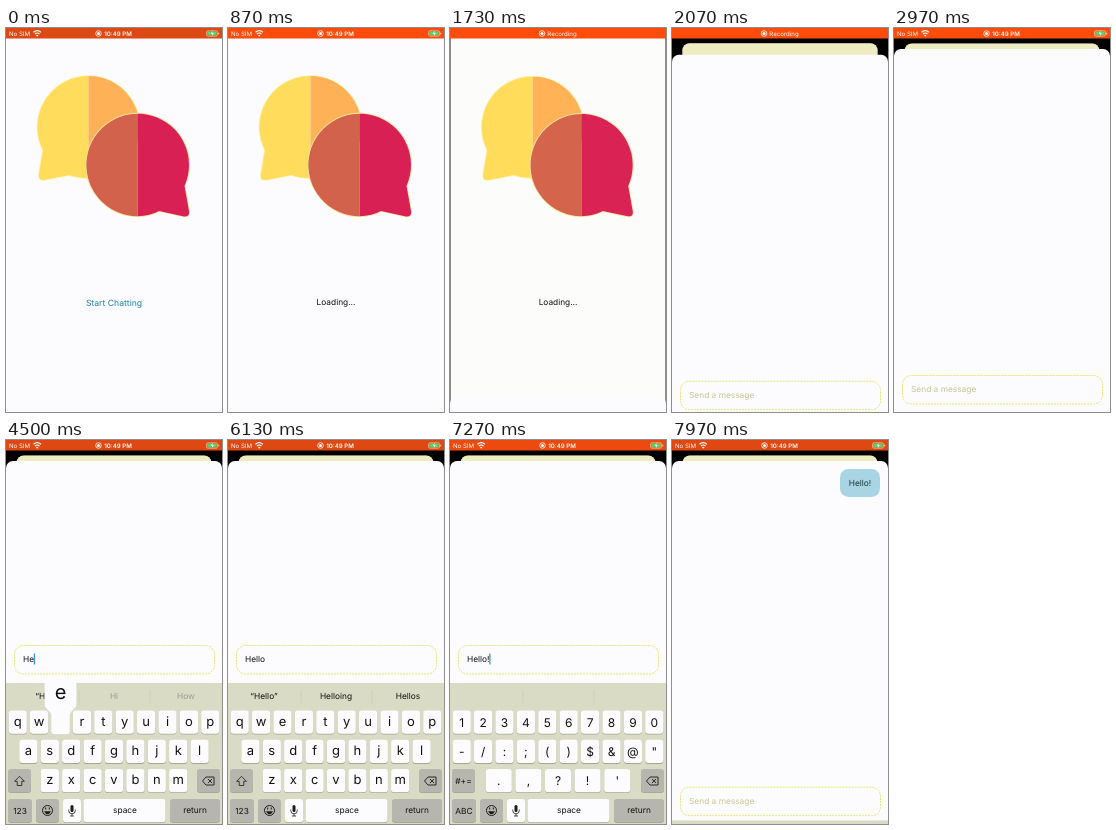
An HTML page for the animation above (8 s loop, 216 by 384 pixels).

```html
<!DOCTYPE html>
<html lang="en">
<head>
<meta charset="utf-8">
<title>Chat demo</title>
<style>
html, body { margin: 0; width: 100%; height: 100%; overflow: hidden; background: #000; }
svg { display: block; width: 100vw; height: 100vh; }
text { font-family: Inter, "Open Sans", sans-serif; font-size: 8.35px; fill: #101210; text-rendering: geometricPrecision; white-space: pre; }
</style>
</head>
<body>
<svg id="stage" viewBox="0 0 216 384"></svg>
<script>
const LOOP = 8000;
const PAPER = '#fcfcfe', GRAY_KEY = '#b6b6ae', INK = '#1c1c18';
const stage = document.getElementById('stage');

function el(parent, tag, attrs = {}, content) {
  const node = document.createElementNS('http://www.w3.org/2000/svg', tag);
  for (const name in attrs) node.setAttribute(name, attrs[name]);
  if (content !== undefined) node.textContent = content;
  parent.appendChild(node);
  return node;
}
const group = parent => el(parent, 'g');
const rect = (p, x, y, width, height, fill, rx = 0) => el(p, 'rect', { x, y, width, height, fill, rx });
const path = (p, d, attrs) => el(p, 'path', { d, fill: 'none', ...attrs });
const label = (p, x, y, str, attrs = {}) => el(p, 'text', { x, y, 'text-anchor': 'middle', ...attrs }, str);
const show = (node, on) => { node.style.display = on ? '' : 'none'; };
const shift = (node, y) => node.setAttribute('transform', `translate(0 ${y})`);

const clamp = v => Math.max(0, Math.min(1, v));
const span = (t, from, length) => clamp((t - from) / length);
const easeOut = p => 1 - (1 - p) ** 4;
const settle = (t, from, rate) => {
  const x = Math.max(0, t - from) / 1000 * rate;
  return 1 - (1 + x) * Math.exp(-x);
};

// Welcome screen
const card = group(stage);
const cardPaper = rect(card, 0, 0, 216, 384, PAPER);
function halves(d, split, left, right, edge) {
  const id = 'clip' + split;
  el(el(card, 'clipPath', { id }), 'path', { d });
  path(card, d, { stroke: edge, 'stroke-width': 1.6 });
  const inside = el(card, 'g', { 'clip-path': `url(#${id})` });
  rect(inside, 0, 40, split, 160, left);
  rect(inside, split, 40, 216, 160, right);
}
halves('M37 122A51 51 0 1 1 82.5 150Q72 150 63 147L38 152Q32 152.5 33 146Z', 82.5, '#ffdc5b', '#ffb157', '#fff0a8');
halves('M178.5 158A51.3 51.3 0 1 0 131.5 188.3Q144 188 153 183L178 188.5Q184 189 183 183Z', 131.5, '#d3624c', '#d92055', '#f8e2a0');
const startText = label(card, 108, 278, 'Start Chatting', { style: 'fill:#1b82ad;font-size:8.65px' });
const loadingText = label(card, 108, 277.3, 'Loading...');
const cardShade = rect(card, 0, 0, 216, 384, '#cbc42f');

// Chat sheet
const sheet = group(stage);
rect(sheet, 0, 21, 216, 420, PAPER, 7);
const bubble = group(sheet);
rect(bubble, 168, 29, 40, 28, '#a9d4e3', 8.5);
label(bubble, 188, 46, 'Hello!', { style: 'fill:#17383a' });
const field = group(sheet);
el(field, 'rect', { x: 8.5, y: 347.5, width: 200, height: 28.5, rx: 9, fill: PAPER, stroke: '#e8e570', 'stroke-dasharray': '2 1' });
const draft = label(field, 17, 364.3, '', { 'text-anchor': 'start' });
const caret = rect(field, 0, 355.5, 1.3, 11, '#3f92dd');

// Keyboard
const keyboard = group(stage);
rect(keyboard, 0, 243, 216, 145, '#dadbc5');
for (const x of [73, 144]) rect(keyboard, x - 0.3, 250, 0.6, 13, '#c8c8b2');
const hints = [36, 108, 180].map(x => label(keyboard, x, 259, ''));

function key(parent, cx, top, width, fill = '#fcfcfe') {
  rect(parent, cx - width / 2, top + 0.8, width, 23.3, '#a5a591', 3);
  rect(parent, cx - width / 2, top, width, 23.3, fill, 3);
}

function drawBottomRow(parent, modeName) {
  key(parent, 14, 359, 24, GRAY_KEY);
  label(parent, 14, 373.5, modeName);
  key(parent, 41.5, 359, 23, GRAY_KEY);
  const ink = { stroke: INK, 'stroke-width': 1 };
  el(parent, 'circle', { cx: 41.5, cy: 370.5, r: 5, fill: 'none', ...ink });
  path(parent, 'M38 371.2Q41.5 377.5 45 371.2Z', { fill: INK });
  path(parent, 'M39.7 367.5v2M43.3 367.5v2', ink);
  key(parent, 66, 359, 18);
  rect(parent, 64.5, 365, 3, 7, INK, 1.5);
  path(parent, 'M62.7 369.5v1a3.3 3.3 0 0 0 6.6 0v-1M66 374v2M64 376h4', { ...ink, 'stroke-width': 0.8 });
  key(parent, 118.5, 359, 82);
  label(parent, 119, 373.3, 'space');
  key(parent, 189, 359, 50, GRAY_KEY);
  label(parent, 189, 373.3, 'return');
}

function drawDelete(parent) {
  key(parent, 202.5, 329, 23, GRAY_KEY);
  path(parent, 'M196.5 341l3.5 -4h8v8h-8ZM202 339l4 4M206 339l-4 4', { stroke: INK, 'stroke-width': 0.9 });
}

function buildLayout(rows, mode) {
  const layer = group(keyboard);
  const spots = {};
  const size = mode === 'lower' ? 13 : 12;
  rows.forEach((row, r) => {
    const top = [270.5, 299.8, 329][r];
    const wide = row.length === 5;
    const pitch = wide ? 29.6 : 21.4;
    [...row].forEach((char, i) => {
      const cx = 108 + (i - (row.length - 1) / 2) * pitch;
      key(layer, cx, top, wide ? 26 : 18.2);
      label(layer, cx, top + (mode === 'lower' ? 15.4 : 16), char, { style: `font-size:${size}px` });
      spots[char] = { cx, top, half: wide ? 13 : 9.1 };
    });
  });
  key(layer, 13.5, 329, 23, mode === 'upper' ? PAPER : GRAY_KEY);
  if (mode === 'symbols') label(layer, 13.5, 343.5, '#+=');
  else path(layer, 'M13.5 336.3l4.9 5h-2.6v4.2h-4.6v-4.2h-2.6Z', {
    fill: mode === 'upper' ? '#000' : 'none', stroke: INK, 'stroke-width': 0.8, 'stroke-linejoin': 'round'
  });
  drawDelete(layer);
  drawBottomRow(layer, mode === 'symbols' ? 'ABC' : '123');
  return { layer, spots };
}
const letters = ['qwertyuiop', 'asdfghjkl', 'zxcvbnm'];
const layouts = {
  upper: buildLayout(letters.map(row => row.toUpperCase()), 'upper'),
  lower: buildLayout(letters, 'lower'),
  symbols: buildLayout(['1234567890', '-/:;()$&@"', ".,?!'"], 'symbols')
};

const popup = group(keyboard);
const popupShape = path(popup, '', { fill: PAPER });
const popupChar = label(popup, 0, 0, '', { style: 'font-size:20px' });
function placePopup(char, { cx, top, half }) {
  const w = half + 6.8, y = top - 32;
  popupShape.setAttribute('d', `M${cx - w + 5} ${y}H${cx + w - 5}q5 0 5 5v20c0 7 -6.8 6 -6.8 13v15q0 3 -3 3H${cx - half + 3}q-3 0 -3 -3v-15c0 -7 -6.8 -6 -6.8 -13v-20q0 -5 5 -5Z`);
  popupChar.setAttribute('x', cx);
  popupChar.setAttribute('y', y + 20.8);
  popupChar.textContent = char;
}

// Status bar
const bar = rect(stage, 0, 0, 216, 10.5, '#e04a12');
const white = { style: 'fill:#fff;font-size:6.1px' };
function recordDot(parent, cx) {
  el(parent, 'circle', { cx, cy: 5.5, r: 2.8, fill: 'none', stroke: '#fff', 'stroke-width': 0.8 });
  el(parent, 'circle', { cx, cy: 5.5, r: 1.5, fill: '#fff' });
}
const clockBar = group(stage);
label(clockBar, 3, 7.8, 'No SIM', { ...white, 'text-anchor': 'start' });
path(clockBar, 'M27.5 4.3q3.7 -3.2 7.4 0M28.9 6q2.3 -2 4.6 0', { stroke: '#fff', 'stroke-width': 1.2 });
path(clockBar, 'M29.9 7.2q1.3 -1 2.6 0l-1.3 1.5Z', { fill: '#fff' });
recordDot(clockBar, 92.5);
label(clockBar, 112, 7.8, '10:49 PM', { style: 'fill:#fff;font-size:6.1px;font-weight:600' });
el(clockBar, 'rect', { x: 200.5, y: 2.8, width: 11, height: 5.4, rx: 1.5, fill: 'none', stroke: '#ffd9c8', 'stroke-width': 0.6 });
rect(clockBar, 201.3, 3.6, 9.4, 3.8, '#55d46a', 0.8);
path(clockBar, 'M206.7 2.8l-2 3h1.5l-.5 2.4 2.2 -3.2h-1.6Z', { fill: '#fff' });
rect(clockBar, 212.3, 4.5, 0.9, 2, '#ffd9c8', 0.4);
const recordingBar = group(stage);
recordDot(recordingBar, 92);
label(recordingBar, 112, 7.8, 'Recording', white);

// Timeline
const presses = [[4130, 'H'], [4440, 'e'], [4760, 'l'], [4960, 'l'], [5300, 'o'], [6880, '!']];
const suggestions = [
  [4430, '“H”', 'Hi', 'How'], [4640, '“He”', 'Hey', 'Her'], [4870, '“Hel”', 'Help', 'Hello'],
  [5080, '“Hell”', 'Hello', 'Hells'], [5400, '“Hello”', 'Helloing', 'Hellos'], [6980, '', '', '']
];
const glow = [[0, 0], [850, 0.9], [1730, 1], [3570, 0.95], [4500, 0], [5300, 0.6], [6130, 0], [7050, 0.6], [8000, 0]];
const SENT = 7450;

function sample(steps, t) {
  const i = Math.max(1, steps.findIndex(step => step[0] > t));
  const [t0, a] = steps[i - 1], [t1, b] = steps[i];
  return a + (b - a) * (t - t0) / (t1 - t0);
}
const lastBefore = (steps, t) => steps.filter(step => step[0] <= t).pop();

function renderStatus(t) {
  const g = sample(glow, t);
  bar.setAttribute('fill', `rgb(${222 + 33 * g},${72 + 4 * g},${18 - 6 * g})`);
  const recording = span(t, 1000, 200) - span(t, 2350, 200);
  recordingBar.setAttribute('opacity', recording);
  clockBar.setAttribute('opacity', 1 - recording);
}

function renderScreens(t) {
  const p = settle(t, 1712, 17);
  const scale = 1 - 0.098 * p;
  card.setAttribute('transform', `translate(${108 * (1 - scale)} ${15.5 * p}) scale(${scale})`);
  cardPaper.setAttribute('rx', 8 * p);
  cardShade.setAttribute('rx', 8 * p);
  cardShade.setAttribute('opacity', 0.3 * p);
  show(startText, t < 700);
  show(loadingText, t >= 700);
  startText.setAttribute('opacity', 1 - 0.75 * span(t, 420, 120));
  shift(sheet, 363 * (1 - p));
  show(sheet, t >= 1712);
  show(bubble, t >= SENT);
}

function renderField(t) {
  const up = easeOut(span(t, 3080, 430)) - easeOut(span(t, 7620, 450));
  shift(field, -142 * up);
  const typed = t < SENT ? presses.filter(([at]) => at <= t).map(([, char]) => char).join('') : '';
  draft.textContent = typed || 'Send a message';
  draft.style.fill = typed ? '#101210' : '#c7c692';
  const since = t - Math.max(3100, ...presses.map(([at]) => at <= t ? at : 0));
  show(caret, since >= 0 && t < 7600 && since % 1000 < 500);
  caret.setAttribute('x', typed ? 17 + draft.getComputedTextLength() - 0.3 : 16.3);
}

function renderKeyboard(t) {
  const up = easeOut(span(t, 3080, 430)) - easeOut(span(t, 7700, 450));
  shift(keyboard, 141 * (1 - up));
  show(keyboard, up > 0);
  const mode = t < 4230 ? 'upper' : t < 6420 ? 'lower' : 'symbols';
  for (const name in layouts) show(layouts[name].layer, name === mode);

  const hint = lastBefore(suggestions, t);
  hints.forEach((node, i) => {
    node.textContent = hint ? hint[i + 1] : '';
    node.setAttribute('opacity', hint && i ? span(t, hint[0], 230) : 1);
  });

  const press = lastBefore(presses, t);
  const held = press && t - press[0] < 100;
  show(popup, held);
  if (held) placePopup(press[1], layouts[mode].spots[press[1]]);
}

function frame(now) {
  const t = now % LOOP;
  renderStatus(t);
  renderScreens(t);
  renderField(t);
  renderKeyboard(t);
}

const start = performance.now();
function tick() {
  frame(performance.now() - start);
  requestAnimationFrame(tick);
}
tick();
</script>
</body>
</html>
```
